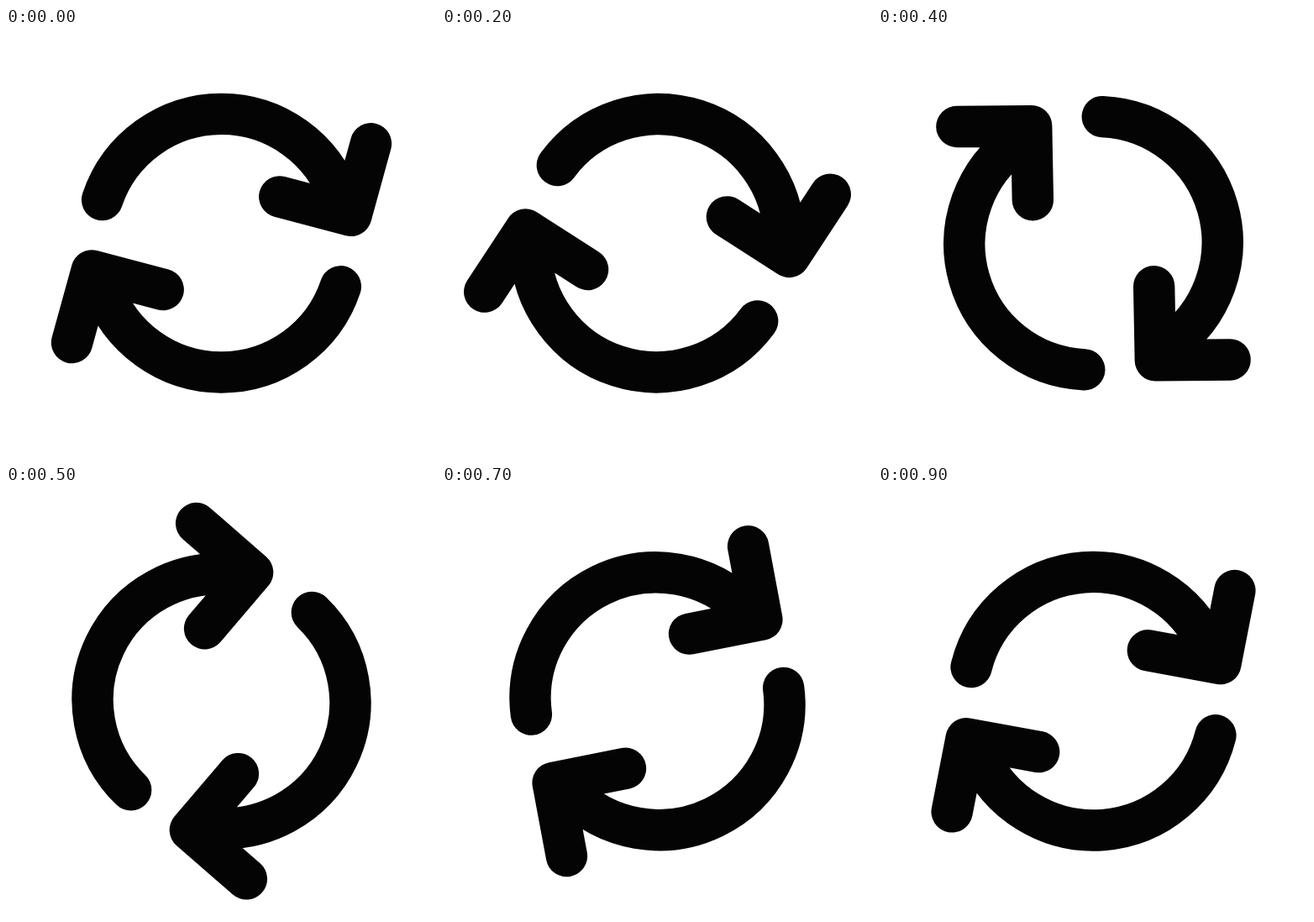
These frames come from a looping animation (512 by 512 pixels, 1000 ms). An HTML page:

```html
<!DOCTYPE html>
<html lang="en">
<head>
<meta charset="utf-8">
<title>Refresh</title>
<style>
  html, body { margin: 0; width: 100%; height: 100%; overflow: hidden; background: #fff; }
  svg { display: block; width: 100vw; height: 100vh; }
  #arrows { fill: none; stroke: #040404; stroke-width: 49.4; stroke-linecap: round; stroke-linejoin: round; }
</style>
</head>
<body>
<svg viewBox="0 0 512 512">
  <defs>
    <path id="arrow" d="M-141.9 -51.6A149.6 149.6 0 0 1 141.9 -51.6M178 -118.4L154.4 -32.8L69.3 -55.3"/>
  </defs>
  <g transform="translate(256.5 256.2)">
    <g id="arrows">
      <use href="#arrow"/>
      <use href="#arrow" transform="rotate(180)"/>
    </g>
  </g>
</svg>
<script>
  // Eased half turn, one pose per 100 ms
  const angles = [0, 4.6, 17.9, 41.5, 74.1, 115.6, 135.9, 154, 167.1, 175.6];
  const hold = 100;
  const arrows = document.getElementById('arrows');
  const start = performance.now();

  function draw(now) {
    const step = Math.floor(Math.max(0, now - start) / hold) % angles.length;
    arrows.setAttribute('transform', `rotate(${angles[step]})`);
    requestAnimationFrame(draw);
  }
  draw(start);
</script>
</body>
</html>
```
